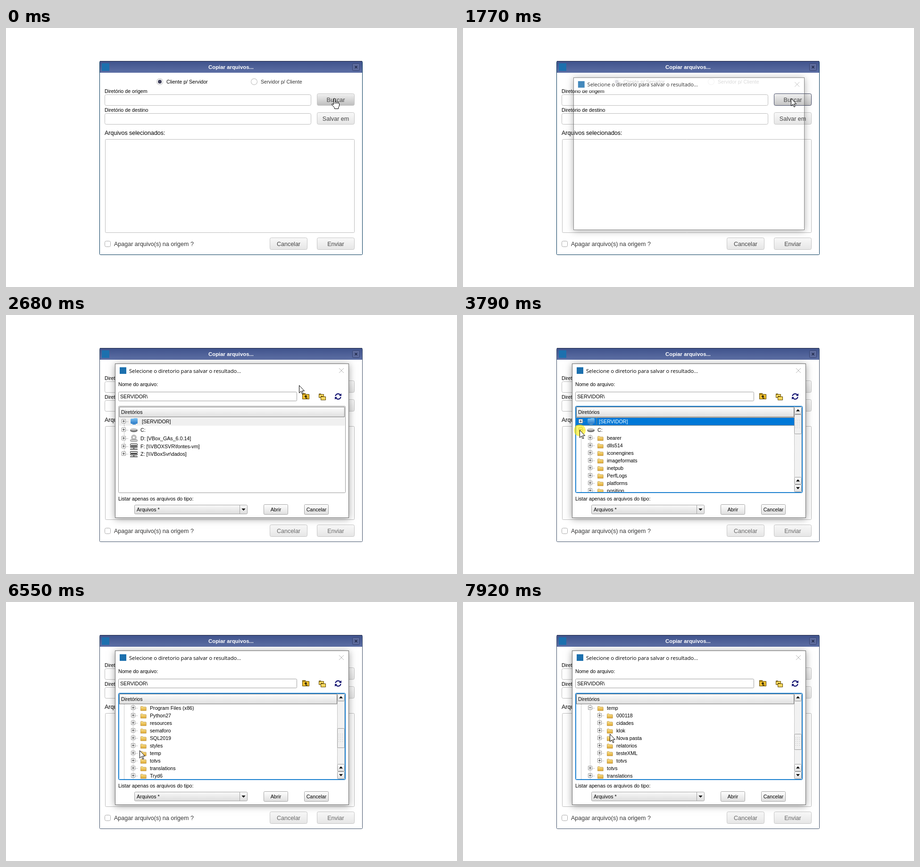
An HTML page with a canvas for the animation above (8 s loop, 956x550 px).

```html
<!DOCTYPE html>
<html lang="pt">
<head>
<meta charset="utf-8">
<title>Copiar arquivos</title>
<style>
html, body { margin: 0; width: 100%; height: 100%; overflow: hidden; background: #fff; }
canvas { display: block; }
</style>
</head>
<body>
<canvas id="stage" width="956" height="550"></canvas>
<script>
const c = document.getElementById('stage').getContext('2d');
const LOOP = 8000, TAU = Math.PI * 2;
const SMALL = '10.67px "Liberation Sans", Arial, sans-serif';
const LARGE = '12.5px "Liberation Sans", Arial, sans-serif';
const BOLD = 'bold 11.36px "Liberation Sans", Arial, sans-serif';
const CAPTION = '11.13px "Open Sans", sans-serif';

const ARROW = new Path2D('M.5 .5V16.5L4.2 13 6.8 18.8 9 17.8 6.5 12.2H11.5Z');
const HAND = new Path2D('M4.5 13.5V2Q4.5 .5 6 .5T7.5 2V8Q9.5 6.5 10.5 8.7 12.5 7.5 13.5 9.7 16 9 16.5 11.5V15Q16.5 18 14.5 20V22.5H6.5V20.5L1 14Q.2 12 2 12Z');
const KNUCKLES = new Path2D('M7.5 8V12M10.5 9V12M13.5 10V12');
const FOLDER = new Path2D('M0 2Q0 1 1 1H4L5.5 2.5H11Q12 2.5 12 3.5V10.5H0Z');

// Pointer moves: start, end, number of jumps, first and last position.
const MOVES = [
  [1640, 1640, 1, 695, 149, 695, 149],
  [2680, 3470, 11, 621, 149, 248, 243],
  [3550, 3550, 1, 247, 244, 247, 244],
  [4530, 4770, 4, 249, 250, 259, 277],
  [5220, 5370, 3, 268, 282, 287, 292],
  [5780, 5880, 2, 286, 296, 285, 300],
  [6550, 6550, 1, 283, 315, 283, 315],
  [6790, 7020, 4, 279, 316, 268, 318],
  [7430, 7920, 7, 271, 314, 311, 280]
];
const SCROLLS = [[0, 0], [5060, 6], [5220, 9], [6080, 12], [7350, 15], [7500, 18]];

const node = depth => name => ({ name, depth });
const drives = ['[SERVIDOR]', 'C:', 'D: [VBox_GAs_6.0.14]', 'F: [\\\\VBOXSVR\\fontes-vm]', 'Z: [\\\\VBoxSvr\\dados]']
  .map((name, i) => ({ name, depth: 0, icon: i, h: i < 3 ? 18 : 16 }));
const folders = ['bearer', 'dlls514', 'iconengines', 'imageformats', 'inetpub', 'PerfLogs', 'platforms',
  'position', 'printsupport', 'Program Files', 'Program Files (x86)', 'Python27', 'resources', 'semaforo',
  'SQL2019', 'styles', 'temp', 'totvs', 'translations', 'Tryd6'].map(node(1));
const tempFolders = ['000118', 'cidades', 'klok', 'Nova pasta', 'relatorios', 'testeXML', 'totvs'].map(node(2));

function treeRows(t) {
  if (t < 3790) return drives;
  const children = folders.slice();
  if (t >= 7180) children.splice(17, 0, ...tempFolders);
  return [...drives.slice(0, 2), ...children, ...drives.slice(2)];
}

const last = (list, t) => list.filter(e => e[0] <= t).pop();

function text(s, x, y, font = SMALL, color = '#000', align = 'left') {
  c.font = font;
  c.fillStyle = color;
  c.textAlign = align;
  c.fillText(s, x, y);
}

function rect(x, y, w, h, color) {
  c.fillStyle = color;
  c.fillRect(x, y, w, h);
}

function fade(y, h, top, bottom) {
  const g = c.createLinearGradient(0, y, 0, y + h);
  g.addColorStop(0, top);
  g.addColorStop(1, bottom);
  return g;
}

// Outlined box covering whole pixels x..x+w-1, y..y+h-1.
function box(x, y, w, h, fill, stroke, r = 0) {
  c.beginPath();
  c.roundRect(x + .5, y + .5, w - 1, h - 1, r);
  c.fillStyle = fill;
  c.fill();
  c.strokeStyle = stroke;
  c.lineWidth = 1;
  c.stroke();
}

function line(color, width, ...p) {
  c.beginPath();
  for (let i = 0; i < p.length; i += 4) {
    c.moveTo(p[i], p[i + 1]);
    c.lineTo(p[i + 2], p[i + 3]);
  }
  c.strokeStyle = color;
  c.lineWidth = width;
  c.stroke();
}

function dotted(...p) {
  c.setLineDash([1, 1]);
  line('#999', 1, ...p);
  c.setLineDash([]);
}

function disc(x, y, r, fill) {
  c.beginPath();
  c.arc(x, y, r, 0, TAU);
  c.fillStyle = fill;
  c.fill();
}

function triangle(x, y, dir) {
  c.beginPath();
  c.moveTo(x - 4, y - 2 * dir);
  c.lineTo(x + 4, y - 2 * dir);
  c.lineTo(x, y + 2.5 * dir);
  c.fillStyle = '#000';
  c.fill();
}

function bigButton(label, x, y, disabled, state) {
  const fills = { hover: ['#f2f2f2', '#bdbdbd'], down: ['#bdbdbd', '#e0e0e0'], focus: ['#f2f2f2', '#c3c3c3'] };
  const [a, b] = fills[state] || ['#f9f9f9', '#e5e5e5'];
  box(x, y, 80, 26, fade(y, 26, a, b), state === 'focus' ? '#454b66' : '#c6c6c6', 3);
  text(label, x + 40, y + 18, LARGE, disabled ? '#686868' : '#444', 'center');
}

function smallButton(label, x) {
  box(x, 402, 52, 22, fade(402, 22, '#fff', '#dedede'), '#a5a5a5', 2);
  text(label, x + 26, 417, SMALL, '#000', 'center');
}

function radio(x, label, on) {
  disc(x, 114, 7, '#bcbcbc');
  disc(x, 114, 6, '#fff');
  if (on) disc(x, 114, 4, '#41425c');
  text(label, x + 14, 118, SMALL, on ? '#000' : '#333');
}

function mainWindow(t) {
  const off = t >= 2250;
  box(198, 70, 558, 412, '#fff', off ? '#44546c' : '#063a5c', 2);
  rect(199, 71, 556, 24, fade(71, 24, '#40538c', '#5d6fa5'));
  line('#1c2440', 1, 199, 70.5, 755, 70.5);
  rect(203, 75, 16, 16, '#1c70ae');
  text('Copiar arquivos...', 477, 87, BOLD, '#fff', 'center');
  box(734, 75, 16, 16, '#5c6a9c', '#344270', 2);
  line('#1d2646', 1.5, 739.5, 80.5, 744.5, 85.5, 744.5, 80.5, 739.5, 85.5);

  radio(326, 'Cliente p/ Servidor', true);
  radio(526, 'Servidor p/ Cliente', false);
  text('Diretório de origem', 209, 138);
  text('Diretório de destino', 209, 178);
  box(209, 141, 438, 24, '#fff', '#bdbdbd', 3);
  box(209, 181, 438, 24, '#fff', '#bdbdbd', 3);
  const state = off ? '' : t < 1090 ? 'hover' : t < 1200 ? 'down' : t < 1380 ? 'hover' : 'focus';
  bigButton('Buscar', 659, 139, off, state);
  bigButton('Salvar em', 659, 179, off);
  text('Arquivos selecionados:', 209, 227, LARGE);
  box(210, 236, 529, 199, '#fff', '#bdbdbd', 2);
  box(209, 452, 13, 13, '#fff', '#aaa', 3);
  text('Apagar arquivo(s) na origem ?', 229, 463, LARGE, '#333');
  bigButton('Cancelar', 559, 445, off);
  bigButton('Enviar', 659, 445, off);
}

function folder(x, y, scale = 1) {
  c.save();
  c.translate(x, y);
  c.scale(scale, scale);
  c.fillStyle = fade(0, 11, '#ffeb9c', '#dda52d');
  c.fill(FOLDER);
  c.strokeStyle = '#b48a35';
  c.lineWidth = .8;
  c.stroke(FOLDER);
  c.restore();
}

function driveIcon(kind, y) {
  if (kind === 0) {
    c.fillStyle = fade(y - 7, 14, '#7ec4f4', '#2070c0');
    c.beginPath();
    c.roundRect(264, y - 6, 9, 11, 2);
    c.roundRect(270, y - 7, 9, 12, 2);
    c.fill();
    rect(268, y + 5, 7, 2, '#5b9bd0');
  } else if (kind === 1) {
    c.beginPath();
    c.ellipse(271, y + 1, 8, 3.8, 0, 0, TAU);
    c.fillStyle = '#707070';
    c.fill();
    c.beginPath();
    c.ellipse(270.5, y - 1, 7, 2.6, 0, 0, TAU);
    c.fillStyle = '#c4c4c4';
    c.fill();
  } else if (kind === 2) {
    disc(271, y - 2, 6, '#bcbcbc');
    disc(271, y - 2, 2, '#fff');
    box(263, y + 2, 16, 5, '#cfcfcf', '#8c8c8c', 2);
  } else {
    box(263, y - 6, 16, 5, '#ddd', '#222', 1);
    box(263, y - 1, 16, 4, '#aaa', '#222', 1);
    line('#222', 1.3, 271, y + 3, 271, y + 6, 263, y + 6, 279, y + 6);
  }
}

function expander(x, y, open) {
  box(x - 4, y - 5, 9, 9, '#fff', '#999');
  line('#333', 1, x - 2, y - .5, x + 3, y - .5);
  if (!open) line('#333', 1, x + .5, y - 3, x + .5, y + 2);
}

function row(n, y, rows, t) {
  const x = 249 + n.depth * 20, h = n.h || 16;
  const server = n.icon === 0, selected = server && t >= 3790;
  if (server) {
    rect(240, y - 8, selected ? 462 : 478, 17, selected ? '#0078d7' : '#f0f0f0');
    if (selected) {
      c.setLineDash([1, 1]);
      line('#f09030', 1, 240, y - 8.5, 702, y - 8.5, 240, y + 8.5, 702, y + 8.5, 283.5, y - 8, 283.5, y + 8);
      c.setLineDash([]);
    }
  }
  for (let d = 0; d <= n.depth; d++) {
    const lx = 250.5 + d * 20 - (d ? 1 : 0);
    const top = server ? y : y - h / 2, end = n === rows[rows.length - 1] ? y : y + h / 2;
    dotted(lx, top, lx, end);
  }
  dotted(x + 5, y + .5, x + 11, y + .5);
  const open = n.name === 'C:' && t >= 3790 || n.name === 'temp' && t >= 7180;
  expander(x, y, open);
  if (n.depth) folder(x + 16.5, y - 4.5, .97);
  else driveIcon(n.icon, y);
  text(n.name, n.depth ? x + 36 : server ? 288 : 285, y + 4, SMALL, selected ? '#fff' : '#000');
}

function scrollbar(first, t) {
  rect(702, 195, 16, 181, '#f2f2f2');
  dotted(702.5, 211, 702.5, 345, 717.5, 211, 717.5, 345);
  for (const [y, dir] of [[195, -1], [344, -1], [360, 1]]) {
    box(702, y, 16, 16, fade(y, 16, '#fff', '#ddd'), '#999', 2);
    triangle(710, y + 7.5, dir);
  }
  const long = t >= 7180;
  const y = Math.round(211 + first * (long ? 3.83 : 4.75)), h = long ? 34 : 42;
  box(702, y, 16, h, '#f0f0f0', '#999', 2);
  for (let i = 0; i < 15; i++) rect(705 + i % 3 * 4, y + h / 2 - 9 + (i / 3 | 0) * 4, 1, 1, '#aaa');
}

function tree(t) {
  const focused = t >= 3790, first = last(SCROLLS, t)[1], rows = treeRows(t);
  box(238, 193, 482, 185, '#fff', focused ? '#0070c8' : '#999', 2);
  if (focused) box(239, 194, 480, 183, '#fff', '#3c93d8', 1);
  c.save();
  c.beginPath();
  c.rect(240, 217, 478, 159);
  c.clip();
  let y = 217;
  for (const n of rows.slice(first)) {
    const h = n.h || 16;
    if (y < 376) row(n, y + h / 2, rows, t);
    y += h;
  }
  c.restore();
  box(240, 195, focused ? 462 : 478, 22, fade(195, 22, '#fff', '#dedede'), '#777');
  text('Diretórios', 244, 210);
  if (focused) scrollbar(first, t);
}

function toolbar() {
  const gold = '#f2c12e', edge = '#5a4400';
  box(628, 166, 7, 4, gold, edge);
  box(628, 168, 15, 11, gold, edge);
  line('#000', 1.4, 635.5, 177, 635.5, 171, 633, 173.5, 635.5, 171, 635.5, 171, 638, 173.5, 635.5, 176.5, 639, 176.5);
  for (const [x, y] of [[663, 167], [667, 172]]) {
    box(x, y, 5, 3, gold, edge);
    box(x, y + 1, 11, 8, '#f8d860', edge);
  }
  c.strokeStyle = '#101070';
  c.lineWidth = 2.2;
  for (const a of [0, Math.PI]) {
    c.save();
    c.translate(704, 173);
    c.rotate(a);
    c.beginPath();
    c.arc(0, 0, 5.7, Math.PI * 1.05, Math.PI * 1.8);
    c.stroke();
    c.beginPath();
    c.moveTo(7, -6.5);
    c.lineTo(7, -1);
    c.lineTo(1.5, -1.5);
    c.fillStyle = '#101070';
    c.fill();
    c.restore();
  }
}

function dialogContent(t) {
  text('Nome do arquivo:', 238, 151);
  box(238, 163, 379, 20, '#fff', '#a0a0a0', 2);
  text('SERVIDOR\\', 242, 177);
  toolbar();
  tree(t);
  text('Listar apenas os arquivos do tipo:', 238, 394);
  box(272, 403, 240, 20, fade(403, 20, '#fafafa', '#dcdcdc'), '#a5a5a5', 2);
  line('#a5a5a5', 1, 495.5, 404, 495.5, 422);
  triangle(503.5, 413, 1);
  text('Arquivos *', 277, 417);
  smallButton('Abrir', 546);
  smallButton('Cancelar', 632);
}

function dialog(t) {
  const [, scale, alpha] = last([[1640, .95, .3], [1770, .988, .82], [1860, .998, .97], [1950, 1, 1]], t);
  c.save();
  c.translate(479, 267);
  c.scale(scale, scale);
  c.translate(-479, -267);
  c.globalAlpha = alpha;

  c.save();
  c.beginPath();
  c.rect(200, 75, 560, 390);
  c.rect(231, 103, 496, 328);
  c.clip('evenodd');
  c.shadowColor = 'rgba(0,0,0,.38)';
  c.shadowBlur = 14;
  c.shadowOffsetY = 2;
  rect(231, 103, 496, 328, '#fff');
  c.restore();

  rect(231, 103, 496, t < 1860 ? 28 : 328, '#fff');
  c.lineWidth = 1;
  c.strokeStyle = '#6c6c6c';
  c.strokeRect(231.5, 103.5, 495, 327);
  rect(241, 111, 14, 14, '#1c70ae');
  text('Selecione o diretorio para salvar o resultado...', 261, 122.5, CAPTION);
  line('#b4b4b4', 1, 706, 113, 716, 123, 716, 113, 706, 123);
  if (t >= 2110) dialogContent(t);
  c.restore();
}

function pointer(t) {
  let x = 690, y = 149, shape = HAND;
  const move = last(MOVES, t);
  if (move) {
    const [t0, t1, n, x0, y0, x1, y1] = move;
    const k = n > 1 ? Math.min(1, Math.floor((t - t0) / (t1 - t0) * (n - 1) + .001) / (n - 1)) : 1;
    x = Math.round(x0 + (x1 - x0) * k);
    y = Math.round(y0 + (y1 - y0) * k);
    shape = ARROW;
  }
  if (t >= 1090 && t < 1200) disc(697, 150, 12.5, 'rgba(255,235,0,.6)');
  if (t >= 3790 && t < 3870) disc(247.5, 245, 12.5, 'rgba(255,235,0,.6)');
  c.save();
  c.translate(x, y);
  c.fillStyle = '#fff';
  c.fill(shape);
  c.strokeStyle = '#000';
  c.lineWidth = 1;
  c.stroke(shape);
  if (shape === HAND) c.stroke(KNUCKLES);
  c.restore();
}

const start = performance.now();
function draw() {
  const t = (performance.now() - start) % LOOP;
  rect(0, 0, 956, 550, '#fff');
  mainWindow(t);
  if (t >= 1640) dialog(t);
  pointer(t);
  requestAnimationFrame(draw);
}
draw();
</script>
</body>
</html>
```
